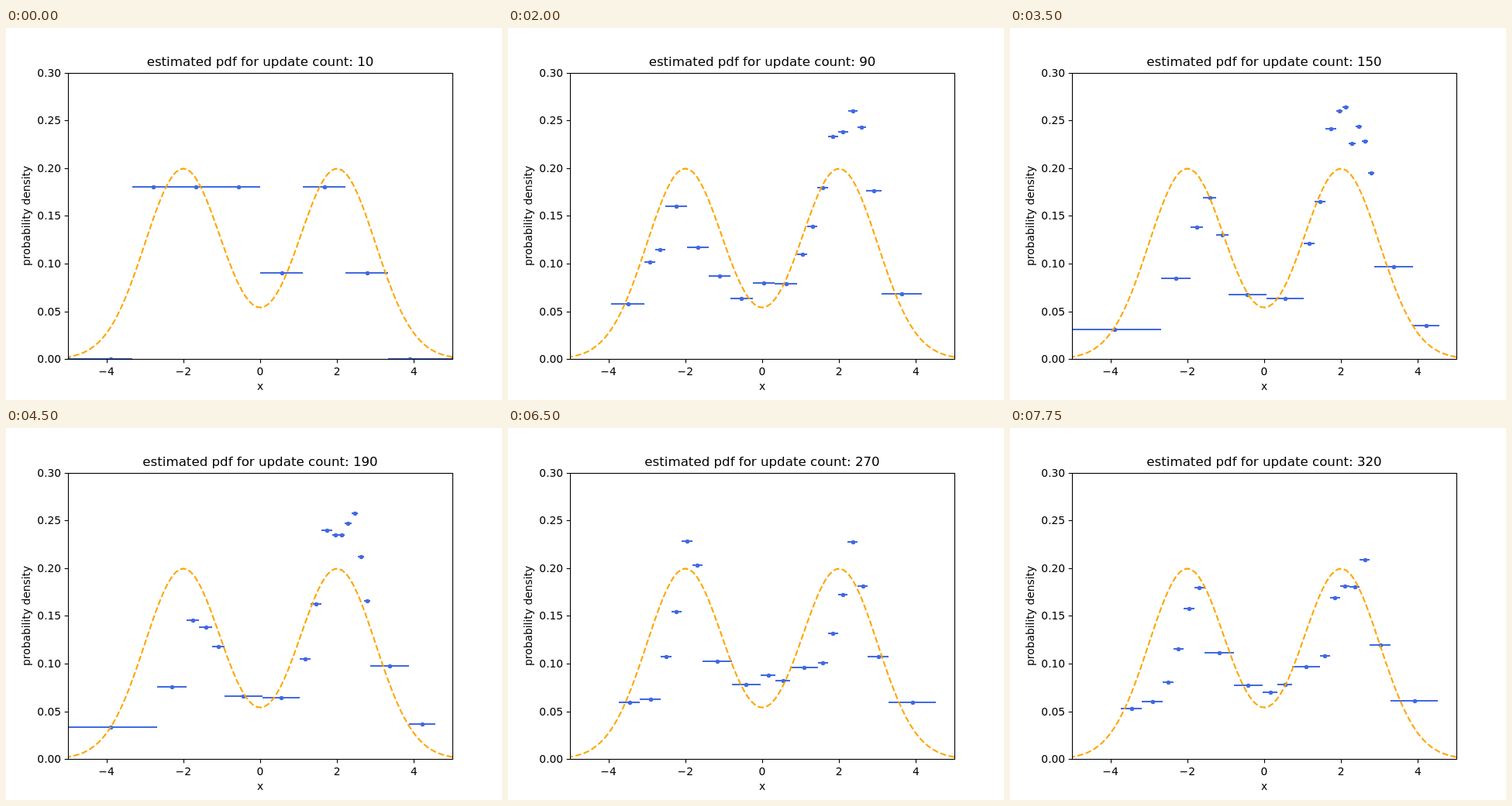
An HTML page with a canvas that plays this animation: 640x480 px, repeating every 8 s.

```html
<!DOCTYPE html>
<html lang="en">
<head>
<meta charset="utf-8">
<title>Estimated pdf</title>
<style>
html, body { margin: 0; width: 100%; height: 100%; overflow: hidden; background: #fff; }
canvas { display: block; width: 640px; height: 480px; }
</style>
</head>
<body>
<canvas id="plot" width="640" height="480"></canvas>
<script>
const ctx = document.getElementById('plot').getContext('2d');
const STEP_MS = 250, STEPS = 32;
const LEFT = 80, RIGHT = 576, TOP = 58, BOTTOM = 427;

const xPx = x => 328 + 49.6 * x;
const xData = px => (px - 328) / 49.6;
const yPx = d => 427.2 - 1232 * d;
const lerp = (a, b, t) => a + (b - a) * t;
const bump = (x, mean, width) => Math.exp(-(((x - mean) / width) ** 2) / 2);
const pdf = x => (bump(x, -2, 1) + bump(x, 2, 1)) / Math.sqrt(8 * Math.PI);

// Samples per bin after the first ten updates; the bins are 1/0.9 wide.
const firstTally = [0, 0, 2, 2, 2, 1, 2, 1, 0, 0];

const uniform = {
  from: 10,
  edge: i => xPx((i - 5) / 0.9),
  bins: firstTally.length,
  density: (x, i, count) => lerp(firstTally[i] * 0.09, pdf(x), (count - 10) / 40)
};

// Adaptive bins: knots are [edge index, pixel], peaks are [mean, width, height].
function adaptive(from, base, peaks, knots) {
  const bins = knots[knots.length - 1][0];
  const edge = i => {
    const k = Math.max(1, knots.findIndex(knot => knot[0] >= i));
    const [i0, p0] = knots[k - 1], [i1, p1] = knots[k];
    return lerp(p0, p1, (i - i0) / (i1 - i0));
  };
  const density = (x, i, count) => {
    let d = base * Math.exp(-((x / 5) ** 4));
    for (const [mean, width, height] of peaks) d += height * bump(x, mean, width);
    return d * (1 + 0.4 * drift(i + from, count / 40));
  };
  return { from, bins, edge, density };
}

const layouts = [
  uniform,
  adaptive(40, 0.07, [[-2.25, 0.5, 0.1], [2.2, 0.6, 0.2]],
    [[0, 133], [1, 176], [3, 203], [6, 287], [9, 373], [14, 439], [16, 462], [17, 482], [18, 534]]),
  adaptive(130, 0.05, [[-1.5, 0.5, 0.11], [2.2, 0.65, 0.22]],
    [[0, 75], [1, 195], [2, 233], [5, 282], [7, 379], [10, 421], [16, 470], [17, 520], [18, 554]]),
  adaptive(260, 0.08, [[-1.8, 0.35, 0.13], [2.3, 0.45, 0.13]],
    [[0, 143], [2, 197], [6, 251], [8, 326], [10, 364], [11, 400], [16, 464], [17, 491], [18, 552]])
];

function noise(a, b) {
  const v = Math.sin(a * 12.9898 + b * 78.233) * 43758.5453;
  return v - Math.floor(v) - 0.5;
}

// Seeded noise that wanders smoothly with t.
function drift(seed, t) {
  const t0 = Math.floor(t);
  return lerp(noise(seed, t0), noise(seed, t0 + 1), t - t0);
}

function line(x1, y1, x2, y2) {
  ctx.beginPath();
  ctx.moveTo(x1, y1);
  ctx.lineTo(x2, y2);
  ctx.stroke();
}

function text(str, x, y, size = 13.889, align = 'center') {
  ctx.font = `${size}px "DejaVu Sans", sans-serif`;
  ctx.textAlign = align;
  ctx.fillText(str, x, y);
}

function drawBins(count) {
  const { bins, edge, density } = layouts.filter(l => l.from <= count).pop();
  ctx.strokeStyle = ctx.fillStyle = '#4169e1';
  ctx.lineWidth = 2.083;
  for (let i = 0; i < bins; i++) {
    const x1 = edge(i), x2 = edge(i + 1), mid = (x1 + x2) / 2;
    const y = Math.round(yPx(density(xData(mid), i, count)));
    line(Math.round(x1), y, Math.round(x2), y);
    ctx.beginPath();
    ctx.arc(Math.round(mid) + 0.5, y + 0.5, 2.78, 0, 2 * Math.PI);
    ctx.fill();
  }
}

function drawCurve() {
  ctx.strokeStyle = '#ffa500';
  ctx.lineWidth = 2.083;
  ctx.lineJoin = 'round';
  ctx.setLineDash([7.708, 3.333]);
  ctx.beginPath();
  // The dash pattern begins at the edge of the stage, outside the axes.
  for (let px = -1; px <= RIGHT + 5; px += 5) ctx.lineTo(px, yPx(pdf(xData(px))));
  ctx.stroke();
  ctx.setLineDash([]);
}

function drawAxes(count) {
  ctx.strokeStyle = ctx.fillStyle = '#000';
  ctx.lineWidth = 1.111;
  ctx.strokeRect(LEFT + 0.5, TOP + 0.5, RIGHT - LEFT, BOTTOM - TOP);
  for (let v = -4; v <= 4; v += 2) {
    const x = Math.round(xPx(v)) + 0.5;
    line(x, BOTTOM + 0.5, x, BOTTOM + 5.36);
    text(String(v).replace('-', '\u2212'), xPx(v), 448);
  }
  for (let i = 0; i <= 6; i++) {
    const y = Math.round(yPx(i * 0.05));
    line(LEFT + 0.5, y + 0.5, LEFT - 4.36, y + 0.5);
    text((i * 0.05).toFixed(2), 71.2, y + 5, undefined, 'right');
  }
  text('x', 328, 467);
  text('estimated pdf for update count: ' + count, 328, 49, 16.667);
  ctx.save();
  ctx.translate(31, 242.4);
  ctx.rotate(-Math.PI / 2);
  text('probability density', 0, 0);
  ctx.restore();
}

function draw(step) {
  const count = 10 * (step + 1);
  ctx.fillStyle = '#fff';
  ctx.fillRect(0, 0, 640, 480);
  ctx.save();
  ctx.beginPath();
  ctx.rect(LEFT, TOP, RIGHT - LEFT, BOTTOM - TOP);
  ctx.clip();
  drawBins(count);
  drawCurve();
  ctx.restore();
  drawAxes(count);
}

const start = performance.now();
function tick() {
  draw(Math.floor((performance.now() - start) / STEP_MS) % STEPS);
  requestAnimationFrame(tick);
}
tick();
</script>
</body>
</html>
```
